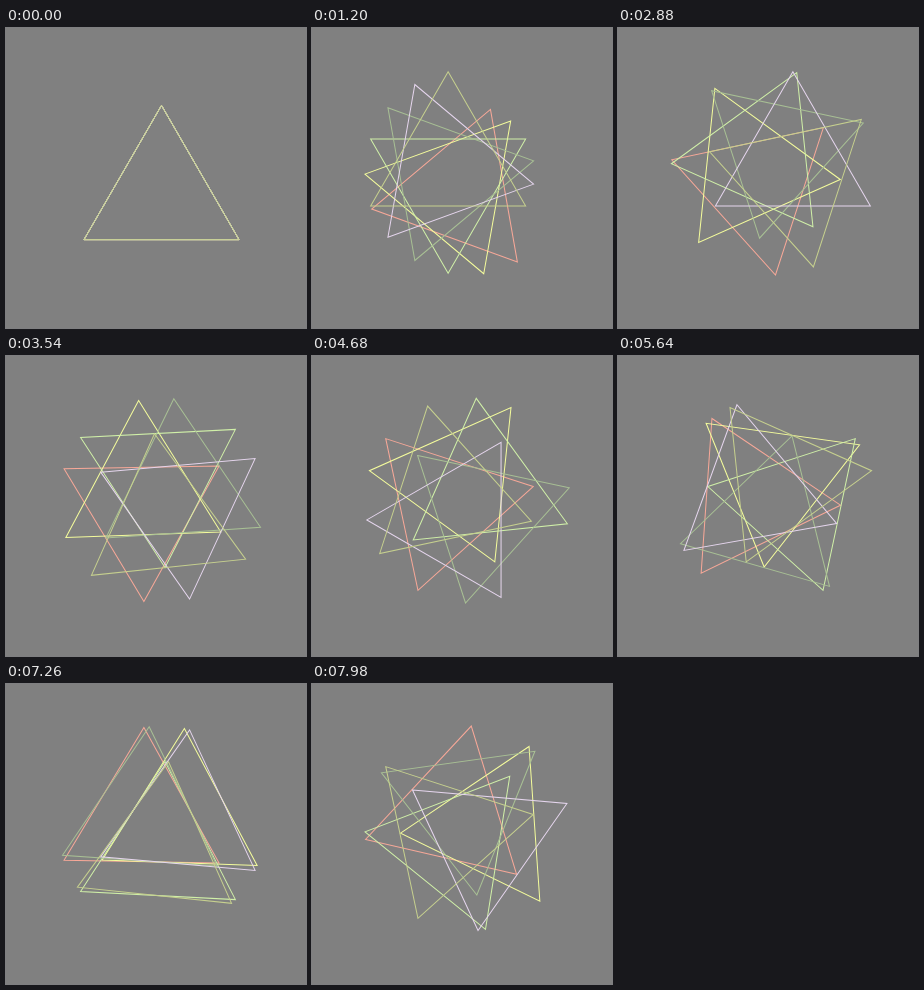
Animation of 300x300 px, one loop 8000 ms. Source, as an HTML page:

```html
<!DOCTYPE html>
<html lang="en">
<head>
<meta charset="utf-8">
<title>Turning triangles</title>
<style>
  html, body { margin: 0; width: 100%; height: 100%; overflow: hidden; background: #808080; }
  svg { display: block; width: 100%; height: 100%; }
  polygon { fill: none; stroke-width: 1; }
</style>
</head>
<body>
<svg viewBox="0 0 300 300"></svg>
<script>
  const LOOP = 8000, STEP = 60;
  const CENTER = { x: 155.5, y: 144.5 };
  const SIDE = 155, HALF_HEIGHT = SIDE * Math.sqrt(3) / 4;
  // The triangle at index i turns i + 1 degrees per step.
  const COLORS = ['#f8a898', '#f4fc9c', '#d0f0a8', '#a8c094', '#e6d6ee', '#c6d08e'];

  const svg = document.querySelector('svg');
  const corners = [[0, -HALF_HEIGHT], [SIDE / 2, HALF_HEIGHT], [-SIDE / 2, HALF_HEIGHT]];

  const triangles = COLORS.map(color => {
    const shape = document.createElementNS('http://www.w3.org/2000/svg', 'polygon');
    shape.setAttribute('points', corners.join(' '));
    shape.setAttribute('stroke', color);
    return svg.appendChild(shape);
  });

  function draw(now) {
    const step = Math.floor((now % LOOP) / STEP);
    triangles.forEach((shape, i) => {
      const angle = step * (i + 1);
      shape.setAttribute('transform', `translate(${CENTER.x} ${CENTER.y}) rotate(${angle})`);
    });
  }

  const start = performance.now();
  function tick() {
    draw(performance.now() - start);
    requestAnimationFrame(tick);
  }
  tick();
</script>
</body>
</html>
```
